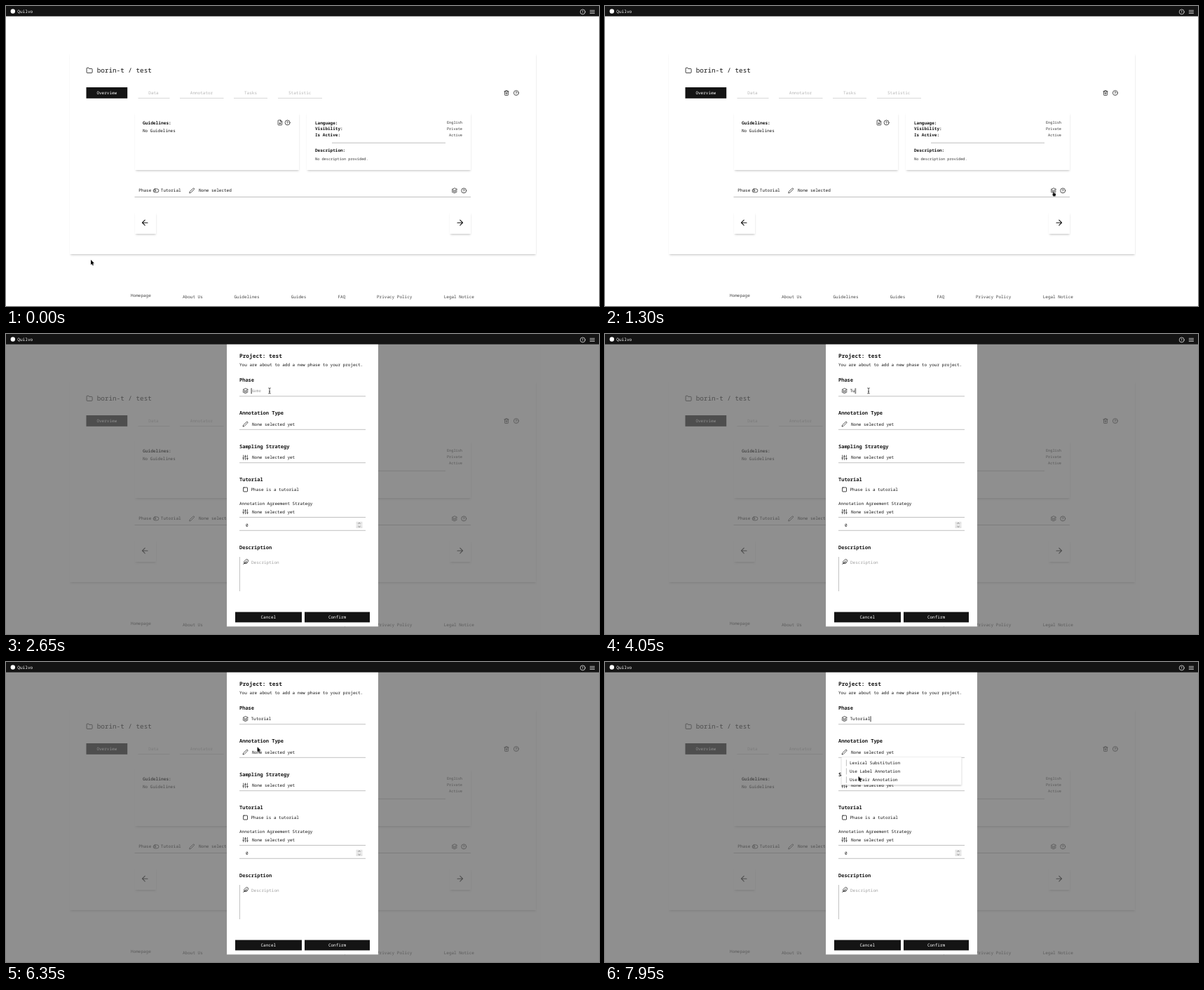
An HTML page that plays this animation: 846 px wide and 428 px high, repeating every 8 s.

```html
<!DOCTYPE html>
<html lang="en">
<head>
<meta charset="utf-8">
<title>New phase</title>
<style>
html, body { margin: 0; width: 100%; height: 100%; overflow: hidden; background: #fff; }
#stage { position: relative; width: 846px; height: 428px; overflow: hidden; }
#stage > svg, #shade { position: absolute; left: 0; top: 0; width: 846px; height: 428px; }
.card {
  position: absolute; background: #fff;
  box-shadow: 0 2px 3px -.5px rgba(0,0,0,.16), 0 1px 2px -1px rgba(0,0,0,.16);
}
#shade { background: rgba(101,101,101,.72); }
text {
  font: 500 6px "Noto Sans Mono", "DejaVu Sans Mono", monospace;
  fill: #141414; text-rendering: geometricPrecision; white-space: pre;
}
.title { font-size: 9.3px; }
.head { font-size: 7.8px; font-weight: 600; }
.label { font-size: 7px; font-weight: 600; }
.bold { font-weight: 600; }
.small { font-size: 5.25px; font-weight: 400; fill: #333; }
.tab text { fill: #b4b4b4; }
.foot text { fill: #444; }
.hint { fill: #a0a0a0; font-weight: 400; }
.light { fill: #fff; }
.mid { text-anchor: middle; }
.end { text-anchor: end; }
.line { stroke: #b0b0b0; stroke-width: .8; fill: none; }
.tab .line { stroke: #cfcfcf; }
symbol { overflow: visible; }
.icons, .bar { fill: none; stroke: #141414; stroke-width: 2; stroke-linecap: round; stroke-linejoin: round; }
.bar { stroke: #fff; }

.dialog, #caret, #typing, #name, #menu, #arrow, #hand, #beam { animation: 8s step-end infinite; }
.dialog { animation-name: dialog; }
#typing { animation-name: typing; }
#caret { animation-name: caret; }
#name { animation-name: name; }
#menu { animation-name: menu; animation-timing-function: linear; }
#arrow { animation-name: arrow; }
#hand { animation-name: hand; }
#beam { animation-name: beam; }
#pointer { animation: move 8s linear infinite; }

@keyframes dialog { 0% { visibility: hidden } 17.5%, 100% { visibility: visible } }
@keyframes name { 0% { opacity: 1 } 48.125%, 100% { opacity: 0 } }
@keyframes caret {
  0% { opacity: 0 } 33.125% { opacity: 1 } 77.5% { opacity: 0 } 92.5%, 100% { opacity: 1 }
}
@keyframes typing {
  0% { transform: translateX(0) }
  48.125% { transform: translateX(3.6px) }
  50.625% { transform: translateX(7.2px) }
  51.875% { transform: translateX(10.8px) }
  56.25% { transform: translateX(14.4px) }
  57.5% { transform: translateX(18px) }
  60.625% { transform: translateX(21.6px) }
  63.125% { transform: translateX(25.2px) }
  65.625%, 100% { transform: translateX(28.8px) }
}
@keyframes menu { 0%, 85% { opacity: 0 } 86.875%, 100% { opacity: 1 } }
@keyframes arrow {
  0% { opacity: 1 } 13.75% { opacity: 0 } 17.5% { opacity: 1 } 31.875% { opacity: 0 }
  76.25% { opacity: 1 } 82.5% { opacity: 0 } 92.5%, 100% { opacity: 1 }
}
@keyframes hand {
  0% { opacity: 0 } 13.75% { opacity: 1 } 17.5% { opacity: 0 }
  82.5% { opacity: 1 } 92.5%, 100% { opacity: 0 }
}
@keyframes beam { 0% { opacity: 0 } 31.875% { opacity: 1 } 76.25%, 100% { opacity: 0 } }
@keyframes move {
  0%, 1.875% { transform: translate(121px, 362px) }
  3.75% { transform: translate(150px, 378px) }
  6.25% { transform: translate(300px, 345px) }
  8.75% { transform: translate(490px, 268px) }
  10.625% { transform: translate(600px, 242px) }
  11.875% { transform: translate(640px, 254px) }
  12.5% { transform: translate(640px, 260px) }
  16.25% { transform: translate(639px, 264.5px) }
  17.5%, 23.75% { transform: translate(638px, 264.5px) }
  26.25% { transform: translate(560px, 188px) }
  28.75% { transform: translate(440px, 82px) }
  30.625% { transform: translate(394px, 54px) }
  32.5%, 75% { transform: translate(376px, 81px) }
  76.25% { transform: translate(370px, 90px) }
  78.125% { transform: translate(353px, 111px) }
  79.375% { transform: translate(358.5px, 121px) }
  80.625%, 82.5% { transform: translate(363.5px, 133px) }
  83.125%, 92.5% { transform: translate(364px, 137px) }
  94.375% { transform: translate(358px, 147px) }
  96.25% { transform: translate(359px, 158px) }
  97.5%, 99.36% { transform: translate(361px, 163.5px) }
  99.375%, 100% { transform: translate(361.5px, 163px) }
}
</style>
</head>
<body>
<div id="stage">
  <div class="card" style="left:91px;top:67px;width:664.5px;height:287px"></div>
  <div class="card" style="left:183.5px;top:152px;width:234px;height:81.5px"></div>
  <div class="card" style="left:429px;top:152px;width:234px;height:81.5px"></div>
  <div class="card" style="left:183.5px;top:294px;width:30px;height:30.5px"></div>
  <div class="card" style="left:633px;top:294px;width:30px;height:30.5px"></div>

  <svg viewBox="0 0 846 428">
    <defs>
      <symbol id="folder" viewBox="0 0 24 24"><path d="M22 19a2 2 0 0 1-2 2H4a2 2 0 0 1-2-2V5a2 2 0 0 1 2-2h5l2 3h9a2 2 0 0 1 2 2z"/></symbol>
      <symbol id="help" viewBox="0 0 24 24"><circle cx="12" cy="12" r="10"/><path d="M9.1 9a3 3 0 0 1 5.8 1c0 2-3 3-3 3M12 17v.1"/></symbol>
      <symbol id="alert" viewBox="0 0 24 24"><circle cx="12" cy="12" r="10"/><path d="M12 7v5M12 16v.1"/></symbol>
      <symbol id="bars" viewBox="0 0 24 24"><path d="M3 6h18M3 12h18M3 18h18"/></symbol>
      <symbol id="trash" viewBox="0 0 24 24"><path d="M3 6h18M19 6v14a2 2 0 0 1-2 2H7a2 2 0 0 1-2-2V6M8 6V4a2 2 0 0 1 2-2h4a2 2 0 0 1 2 2v2M10 11v6M14 11v6"/></symbol>
      <symbol id="file" viewBox="0 0 24 24"><path d="M14 2H6a2 2 0 0 0-2 2v16a2 2 0 0 0 2 2h12a2 2 0 0 0 2-2V8zV8h6M12 18v-6M9 15h6"/></symbol>
      <symbol id="toggle" viewBox="0 0 24 24"><rect x="1" y="5" width="22" height="14" rx="7"/><circle cx="8" cy="12" r="3"/></symbol>
      <symbol id="pen" viewBox="0 0 24 24"><path d="M17 3a2.8 2.8 0 1 1 4 4L7.5 20.500 2 22l1.500-5.500z"/></symbol>
      <symbol id="layers" viewBox="0 0 24 24"><path d="M12 2 2 7l10 5 10-5zM2 17l10 5 10-5M2 12l10 5 10-5"/></symbol>
      <symbol id="next" viewBox="0 0 24 24"><path d="M5 12h14M12 5l7 7-7 7"/></symbol>
      <symbol id="back" viewBox="0 0 24 24"><path d="M19 12H5M12 19l-7-7 7-7"/></symbol>
      <symbol id="sliders" viewBox="0 0 24 24"><path d="M4 21v-7M4 10V3M12 21v-9M12 8V3M20 21v-5M20 12V3M1 14h6M9 8h6M17 16h6"/></symbol>
      <symbol id="feather" viewBox="0 0 24 24"><path d="M20.200 12.200a6 6 0 0 0-8.500-8.500L5 10.500V19h8.500zM16 8 2 22M17.500 15H9"/></symbol>
    </defs>

    <text class="title" x="129.700" y="94.900">borin-t / test</text>
    <g class="tab">
      <rect x="114.500" y="116" width="58.700" height="15.800" fill="#141414"/>
      <text class="mid" x="143.800" y="125.700" style="fill:#fff">Overview</text>
      <text class="mid" x="210.500" y="125.700">Data</text>
      <text class="mid" x="279" y="125.700">Annotator</text>
      <text class="mid" x="349" y="125.700">Tasks</text>
      <text class="mid" x="419.200" y="125.700">Statistic</text>
      <path class="line" d="M188.500 131.500h45M248 131.500h62.500M325 131.500h48M388 131.500h63"/>
    </g>

    <text class="bold" x="195" y="168.500" style="font-size:6.200px">Guidelines:</text>
    <text x="195" y="180.400">No Guidelines</text>
    <text class="bold" x="441" y="168.500">Language:</text>
    <text class="bold" x="441" y="177.400">Visibility:</text>
    <text class="bold" x="441" y="186.400">Is Active:</text>
    <text class="small end" x="651" y="168.300">English</text>
    <text class="small end" x="651" y="177.300">Private</text>
    <text class="small end" x="651" y="186.300">Active</text>
    <text class="bold" x="441" y="208.400">Description:</text>
    <text class="small" x="441" y="219.700">No description provided.</text>
    <path class="line" d="M465 195.300h162M183.500 272.500h479.500"/>

    <text x="189.300" y="265.400">Phase</text>
    <text x="220.800" y="265.400">Tutorial</text>
    <text x="275" y="265.400">None selected</text>

    <g class="icons">
      <use href="#folder" x="114.300" y="87" width="9.600" height="9.600"/>
      <use href="#trash" x="709.800" y="119.800" width="8.400" height="8.400"/>
      <use href="#help" x="723.700" y="119.800" width="8.400" height="8.400"/>
      <use href="#file" x="386.700" y="162.200" width="8.400" height="8.400"/>
      <use href="#help" x="397.400" y="162.200" width="8.400" height="8.400"/>
      <use href="#toggle" x="209.800" y="259.200" width="8.400" height="8.400"/>
      <use href="#pen" x="261" y="259.200" width="8.400" height="8.400"/>
      <use href="#layers" x="635.500" y="259.200" width="8.400" height="8.400"/>
      <use href="#help" x="649" y="259.200" width="8.400" height="8.400"/>
      <use href="#back" x="191.700" y="302.700" width="13" height="13"/>
      <use href="#next" x="641.300" y="302.700" width="13" height="13"/>
    </g>

    <g class="foot">
      <text x="178" y="415.200">Homepage</text>
      <text x="252" y="416.800">About Us</text>
      <text x="325.500" y="416.800">Guidelines</text>
      <text x="406.700" y="416.800">Guides</text>
      <text x="473.500" y="416.800">FAQ</text>
      <text x="529" y="416.800">Privacy Policy</text>
      <text x="624.700" y="416.800">Legal Notice</text>
    </g>
  </svg>

  <div id="shade" class="dialog"></div>

  <svg class="dialog" viewBox="0 0 846 428">
    <rect x="315" y="14" width="216" height="403.300" fill="#fff"/>
    <text class="head" x="333" y="33.600">Project: test</text>
    <text x="333" y="45.800">You are about to add a new phase to your project.</text>
    <text class="label" x="333" y="67.800">Phase</text>
    <text class="label" x="333" y="115.400">Annotation Type</text>
    <text class="label" x="333" y="162.800">Sampling Strategy</text>
    <text class="label" x="333" y="210.400">Tutorial</text>
    <text x="333" y="243.600">Annotation Agreement Strategy</text>
    <text class="label" x="333" y="306.600">Description</text>

    <text x="349.500" y="83.300">Tutorial</text>
    <g id="typing">
      <rect x="349.600" y="76" width="32" height="11" fill="#fff"/>
      <path id="caret" d="M350.100 77.300v8" stroke="#111" stroke-width=".9"/>
    </g>
    <text id="name" class="hint" x="349.500" y="83.300">Name</text>

    <text x="351" y="130.800">None selected yet</text>
    <text x="351" y="178.300">None selected yet</text>
    <text x="349.500" y="224.300">Phase is a tutorial</text>
    <text x="351" y="255.600">None selected yet</text>
    <text x="342" y="274.500">0</text>
    <text class="hint" x="350" y="328.200">Description</text>
    <path class="line" d="M333 88.800h180M333 136.300h180M333 183.700h180M333 261.500h180M333 280.300h180M333.400 318v49"/>

    <rect x="499.500" y="267.800" width="9" height="9.200" fill="#e4e4e4"/>
    <path d="M499.500 272.400h9" stroke="#fff" stroke-width=".6"/>
    <path d="M502.400 270.800l1.600-1.500 1.600 1.500M502.400 274l1.600 1.500 1.600-1.500" fill="none" stroke="#666" stroke-width=".7"/>

    <g class="icons">
      <use href="#layers" x="337.300" y="77" width="8.400" height="8.400"/>
      <use href="#pen" x="337.300" y="124.400" width="8.400" height="8.400"/>
      <use href="#sliders" x="337.300" y="172" width="8.400" height="8.400"/>
      <use href="#sliders" x="337.300" y="249.300" width="8.400" height="8.400"/>
      <use href="#feather" x="338" y="320.800" width="8.400" height="8.400"/>
      <rect x="338.600" y="219" width="5.900" height="5.900" rx=".6" stroke-width=".8"/>
    </g>

    <rect x="327" y="396.600" width="95" height="14.800" fill="#141414"/>
    <rect x="426" y="396.600" width="93" height="14.800" fill="#141414"/>
    <text class="light mid" x="374.300" y="406.200">Cancel</text>
    <text class="light mid" x="472.500" y="406.200">Confirm</text>

    <g id="menu">
      <rect x="337.500" y="136" width="171" height="39.300" fill="#fff" style="filter:drop-shadow(0 1px 1.200px rgba(0,0,0,.25))"/>
      <path class="line" d="M344.400 139.500v9M344.400 151.500v9M344.400 163.500v9"/>
      <text x="349" y="146.200">Lexical Substitution</text>
      <text x="349" y="158.200">Use Label Annotation</text>
      <text x="349" y="170.200">Use Pair Annotation</text>
    </g>
  </svg>

  <svg viewBox="0 0 846 428">
    <rect width="846" height="14.700" fill="#141414"/>
    <circle cx="9.800" cy="7.500" r="3.200" fill="#fff"/>
    <text class="light" x="16.300" y="9.800" style="font-size:6.100px">Quilvo</text>
    <g class="bar">
      <use href="#alert" x="818.600" y="4.200" width="8.400" height="8.400"/>
      <use href="#bars" x="832.200" y="4.200" width="8.400" height="8.400"/>
    </g>

    <g id="pointer">
      <path id="arrow" d="M0 0V7.200L1.600 5.700 2.700 8.200 3.900 7.700 2.800 5.200H5Z" fill="#000" stroke="#fff" stroke-width=".6" paint-order="stroke"/>
      <path id="hand" d="M.300 .600Q.800 0 1.300 .600V2.400L3.700 2.900Q4.200 3.100 4.100 3.800L3.600 6.800H.500L-1 4.300Q-.900 3.500 .300 4.300Z" fill="#000" stroke="#fff" stroke-width=".5" paint-order="stroke"/>
      <path id="beam" d="M-1.700 -4Q0 -4 0 -3Q0 -4 1.700 -4M0 -3V3M-1.700 4Q0 4 0 3Q0 4 1.700 4M-.900 1h1.800" fill="none" stroke="#222" stroke-width=".8"/>
    </g>
  </svg>
</div>
</body>
</html>
```
